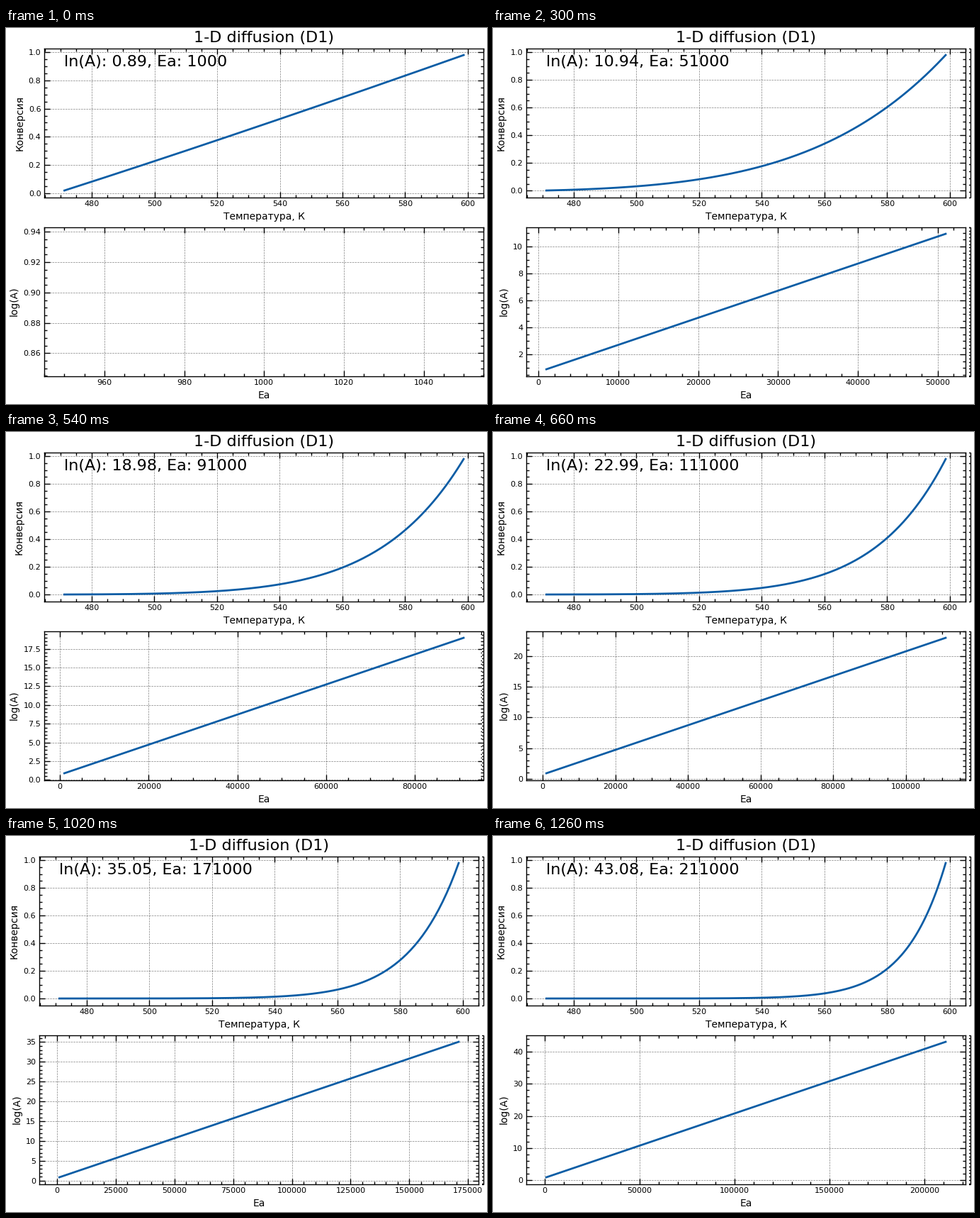
Animation of 679x530 px, one loop 1320 ms. Source, as a matplotlib script:

```python
import matplotlib.pyplot as plt
import numpy as np
from matplotlib.animation import FuncAnimation
from matplotlib.markers import TICKLEFT
from matplotlib.patches import Rectangle
from matplotlib.transforms import Bbox

W, H, DPI = 679, 530, 100
FRAMES, INTERVAL = 22, 60
PAD = 5                      # margin around the content, px
CUT = 672                    # columns right of this keep an older picture
FULL = (0, 1, 10)            # steps that repaint the whole width
BOXES = ((100, 318, 620, 210), (100, 66, 620, 210))

R = 8.314
T = np.linspace(471.25, 598.7, 200)
TAU = np.linspace(0.02, 0.98, 200)
EA = 1000 + 10000 * np.arange(FRAMES)
LN_A = np.log(2) + EA / (R * T[-1])

plt.rcParams.update({
    "font.family": "DejaVu Sans", "font.size": 10,
    "axes.linewidth": 1, "axes.titlesize": 16, "axes.grid": True,
    "axes.axisbelow": True,
    "grid.color": "k", "grid.linestyle": "--",
    "grid.linewidth": 0.5, "grid.alpha": 0.5,
    "lines.linewidth": 2,
    "xtick.top": True, "ytick.right": True,
})
for tick in ("xtick", "ytick"):
    plt.rcParams.update({
        f"{tick}.direction": "in", f"{tick}.labelsize": 8,
        f"{tick}.minor.visible": True,
        f"{tick}.major.size": 6, f"{tick}.minor.size": 3,
        f"{tick}.major.width": 1, f"{tick}.minor.width": 1,
    })

fig, axs = plt.subplots(2, 1, figsize=(W / DPI, H / DPI), dpi=DPI)
top, low = axs
curve, = top.plot([], [], color="#0C5DA5")
trend, = low.plot([], [], color="#0C5DA5")
top.set(title="1-D diffusion (D1)", xlabel="Температура, К", ylabel="Конверсия")
low.set(xlabel="Ea", ylabel="log(A)")
note = top.text(T[0], 0.9, "", fontsize=16)

# Narrow strip at the right edge, in pixel coordinates
strip = fig.add_axes([CUT / W, 0, 1 - CUT / W, 1], zorder=5)
strip.set(xticks=[], yticks=[])
strip.minorticks_off()
strip.spines[:].set_visible(False)


def make_edge():
    frame = strip.add_patch(Rectangle((0, 0), 1, 1, fill=False, ec="k", lw=1))
    ticks = [strip.plot([], [], "k", ls="", marker=TICKLEFT, ms=size, mew=1)[0]
             for size in (6, 3)]
    return frame, ticks


edges = [make_edge() for _ in axs]
strip.set(xlim=(CUT, W), ylim=(0, H))


def place(dx, dy):
    for ax, (x, y, w, h) in zip(axs, BOXES):
        ax.set_position([(x - dx) / W, (y - dy) / H, w / W, h / H])


def layout(i):
    """Set the data of step i and shift the axes so the content fits tightly."""
    alpha = TAU * np.exp(-EA[i] / R * (1 / T - 1 / T[-1]))
    curve.set_data(T, alpha)
    trend.set_data(EA[:i + 1], LN_A[:i + 1])
    note.set_text(f"ln(A): {LN_A[i]:.2f}, Ea: {EA[i]}")
    for ax in axs:
        ax.relim()
        ax.autoscale_view()
    place(0, 0)
    tight = Bbox.union([ax.get_tightbbox() for ax in axs])
    place(tight.x0 - PAD, tight.y0 - PAD)


def copy_edges():
    """Copy the right-hand spines and ticks into the strip."""
    for ax, (frame, ticks) in zip(axs, edges):
        box = ax.bbox
        frame.set_bounds(*box.bounds)
        lo, hi = ax.get_ylim()
        locs = ax.yaxis.get_majorticklocs(), ax.yaxis.get_minorticklocs()
        for line, ys in zip(ticks, locs):
            ys = np.array([y for y in ys if lo <= y <= hi])
            px = box.y0 + (ys - lo) / (hi - lo) * box.height
            line.set_data(np.full(len(px), box.x1), px)


def update(i):
    strip.set_visible(i not in FULL)
    if i not in FULL:
        layout(max(f for f in FULL if f < i))
        copy_edges()
    layout(i)


anim = FuncAnimation(fig, update, frames=FRAMES, interval=INTERVAL,
                     repeat=True, repeat_delay=0, blit=False)
plt.show()
```
